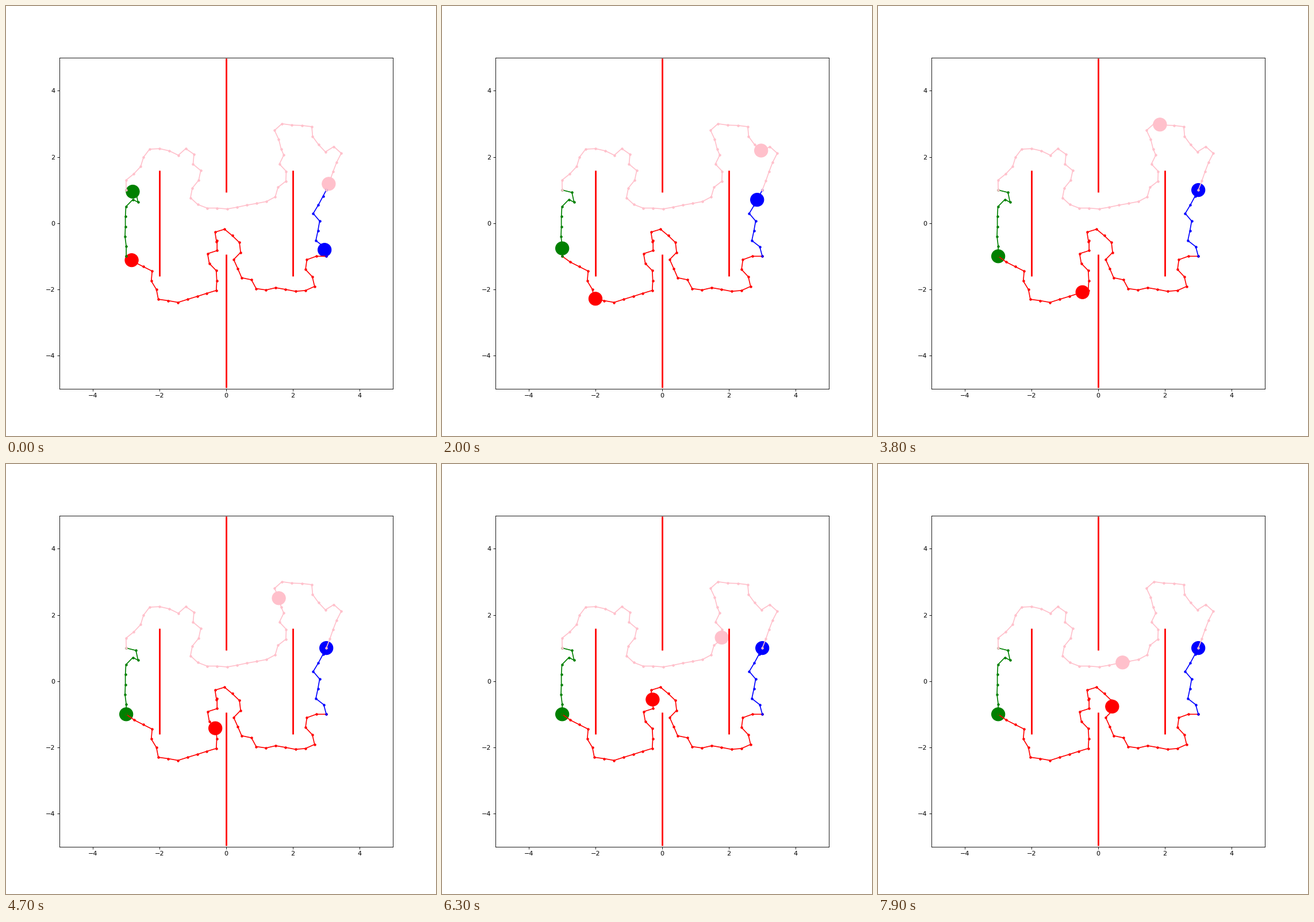
A matplotlib script that plays this animation: 748 px wide and 748 px high, repeating every 8000 ms.

```python
import numpy as np
import matplotlib.pyplot as plt
from matplotlib.animation import FuncAnimation
from matplotlib.patches import Circle

FRAMES, INTERVAL = 80, 100
HOP = 0.3        # distance between waypoints
RADIUS = 0.2


def hops(headings):
    """Running sum of equal steps along headings in degrees."""
    a = np.radians(np.array(headings, float))
    steps = HOP * np.column_stack([np.cos(a), np.sin(a)])
    return np.vstack([np.zeros(2), np.cumsum(steps, axis=0)])


def route(start, out, back, goal):
    """Two chains, one leaving the start, one reaching the goal, joined."""
    tail = hops(back)
    return np.vstack([start + hops(out), goal + tail - tail[-1]])


def follow(path, pace):
    """Place on the path per frame: slow start, steady pace, cut corners."""
    t = np.arange(FRAMES)
    end = len(path) - 1
    u = 0.67 + pace * (0.298 * t - 0.6 * (1 - np.exp(-t / 6)))
    u = np.minimum(u, end)
    cut = np.minimum(0.2, end - u)

    def at(v):
        return np.column_stack([np.interp(v, np.arange(end + 1), c)
                                for c in path.T])

    return (at(u - cut) + at(u + cut)) / 2


NW, NE, SW, SE = (np.array(p) for p in [(-3, 1), (3, 1), (-3, -1), (3, -1)])

red = route(
    SW,
    [-36, -27, -27, -95, -59, -79, -8, -10, 18, 17, 18, 17, 87, 93, 134,
     100, 18, 90],
    [99, 17, -40, -44, -83, -134, -66, -67, -12, -62, -8, 13, -10, -11, 5,
     24, 103, 133, 82, 20, 0],
    SE)
blue = route(SE, [105, 142, 78, 80, 130, 59, 62], [], NE)
green = route(NW, [-14, -78], [-134, -93, -90, -92, -83, -90], SW)
pink = route(
    NE,
    [69, 71, 69, 63, 138, -148, 133, 126, 95, 173, 178, 172, -138, -65, -76],
    [-116, -47, -92, -142, -106, -152, -169, -170, -168, -170, 175, 180,
     159, 137, 79, 51, 78, 140, 85, 145, -138, 154, 167, -177, -127, -107,
     -133, -141, -89],
    NW)

fig, ax = plt.subplots(figsize=(9.35, 9.35), dpi=80)
fig.subplots_adjust(left=0.1245)
ax.set(xlim=(-5, 5), ylim=(-5, 5),
       xticks=range(-4, 5, 2), yticks=range(-4, 5, 2))

for x, low, high in [(-2, -1.6, 1.6), (2, -1.6, 1.6),
                     (0, 0.94, 4.97), (0, -4.97, -0.94)]:
    ax.plot([x, x], [low, high], color="red", lw=2.5, solid_capstyle="butt")

agents = []
for color, path, pace in [("red", red, 1), ("blue", blue, 1.1),
                          ("green", green, 1.4), ("pink", pink, 1)]:
    ax.plot(*path.T, ".-", color=color)
    spots = follow(path, pace)
    disc = ax.add_patch(Circle(spots[0], RADIUS, color=color))
    agents.append((disc, spots))


def update(frame):
    for disc, spots in agents:
        disc.center = spots[frame]
    return [disc for disc, _ in agents]


anim = FuncAnimation(fig, update, frames=FRAMES, interval=INTERVAL,
                     repeat=True, repeat_delay=0)
plt.show()
```
